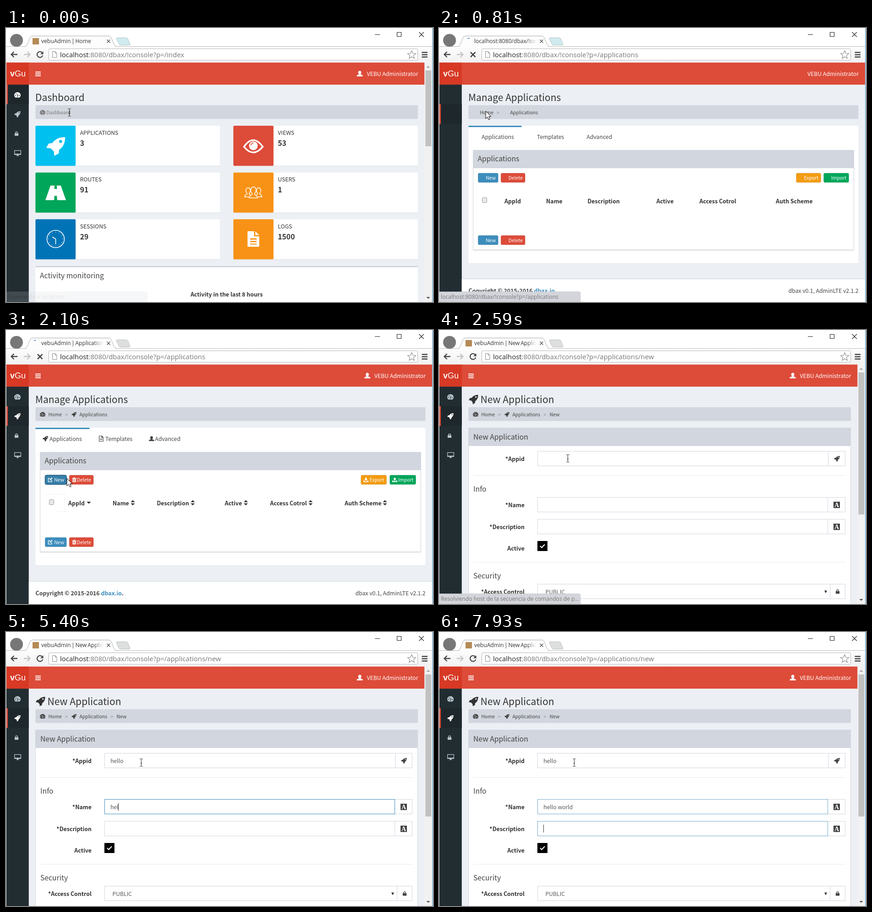
Recreate the animation shown at these times as an HTML page. Size 933x600 px, loop 8 s.

```html
<!DOCTYPE html>
<html lang="en">
<head>
<meta charset="utf-8">
<title>Admin console</title>
<style>
html, body { margin: 0; width: 100%; height: 100%; overflow: hidden; background: #fff; }
svg { display: block; }
.page { font-family: 'Noto Sans CJK JP', 'Noto Sans CJK SC', 'Noto Sans CJK KR', 'Noto Sans CJK', 'Open Sans', sans-serif; }
.chrome { font-family: 'Open Sans', 'Noto Sans', sans-serif; }
text { white-space: pre; }
</style>
</head>
<body>
<svg id="stage" width="933" height="600" viewBox="0 0 933 600"></svg>
<script>
const icons = {
  rocket: 'M23.500.5C16 .5 11 3 7.500 8L3 8.500 0 14 5.500 14.500 9.500 18.500 10 24 15.500 21 16 16.500C21 13 23.500 8 23.500.5zM19.800 6a1.900 1.900 0 1 0-3.800 0a1.900 1.900 0 1 0 3.800 0z',
  gauge: 'M4 21A12 11.500 0 1 1 20 21zM10.500 18L13 7l1.500.5L13.500 18zM3.500 12h3v3h-3zM6 6h3v3H6zM17.500 12h3v3h-3z',
  lock: 'M3 11h18v12H3zM6 11V8a6 6 0 0 1 12 0v3h-3V8a3 3 0 0 0-6 0v3z',
  desk: 'M0 2h24v16H0zM2 4v10h20V4zM9 18h6v3h2v1H7v-1h2z',
  user: 'M12 1a5.500 6.500 0 0 1 3.500 12l1 2.500 7 2.500v4.500H.5V18l7-2.500 1-2.500A5.500 6.500 0 0 1 12 1z',
  edit: 'M2 4h12l-2 3H5v13h13v-6l3-3v12H2zM21 1l3 3-10 10-4 1 1-4z',
  trash: 'M2 4h6l1-3h6l1 3h6v3H2zM4 8h16v15H4zM7.500 10v10h1.500V10zM11.200 10v10h1.500V10zM15 10v10h1.500V10z',
  down: 'M9 1h6v8h5l-8 8-8-8h5zM0 16h5l4 4h6l4-4h5v7H0z',
  up: 'M9 16V9H4l8-8 8 8h-5v7zM0 16h7v3h10v-3h7v7H0z',
  file: 'M3 0h12l6 6v18H3zM5 2v20h14V8h-6V2zM7 11h10v2H7zM7 15h10v2H7z',
  doc: 'M3 0h10v8h8v16H3zM15 0l6 6h-6zM7 11v2h10v-2zM7 15v2h10v-2zM7 19v1.500h10V19z',
  road: 'M6 4h4.700l-.3 4h3.200l-.3-4H18l6 17H13.800l-.4-5h-2.800l-.4 5H0z'
};
const icon = (name, x, y, size, fill) =>
  `<path d="${icons[name]}" fill="${fill}" fill-rule="evenodd" transform="translate(${x} ${y}) scale(${size / 24}) translate(-12 -12)"/>`;
const rect = (x, y, w, h, fill, more = '') =>
  `<rect x="${x}" y="${y}" width="${w}" height="${h}" fill="${fill}" ${more}/>`;
const line = (d, stroke, width = 1, more = '') =>
  `<path d="${d}" fill="none" stroke="${stroke}" stroke-width="${width}" ${more}/>`;
const shape = (d, fill, more = '') => `<path d="${d}" fill="${fill}" ${more}/>`;
// The page is shown at 97.5 %, and the CJK family carries enlarged Latin letters.
const ZOOM = 0.975, LATIN = 0.895;
const label = (x, y, size, str, fill = '#333', more = '') =>
  `<text x="${x}" y="${y}" font-size="${(size * ZOOM * LATIN).toFixed(2)}" fill="${fill}" ${more}>${str}</text>`;
const ui = (x, y, size, str, fill, more = '') =>
  `<text x="${x}" y="${y}" font-size="${size}" fill="${fill}" ${more}>${str}</text>`;
const group = (id, body, more = '') => `<g id="${id}" ${more}>${body}</g>`;
const bold = 'font-weight="700"', end = 'text-anchor="end"', STRONG = 14.250;
const RED = '#dd4b39', BLUE = '#3c8dbc', GREY = '#d2d6de', DARK = '#444';
const LEFT = 64.350, TOP = 75.300, HEAD = 50 * ZOOM;

function frame(right, active, loaded) {
  const marks = [['gauge', 25, 147], ['rocket', 25, 189], ['lock', 23, 231], ['desk', 25.500, 274]];
  const low = TOP + HEAD, item = 44 * ZOOM, top = low + active * item;
  let s = rect(1, TOP, 930, 525, '#ecf0f5') + rect(1, TOP, right - 1, HEAD, RED) +
    rect(1, TOP, HEAD, HEAD, '#d73925') + rect(1, low, HEAD, 476, '#222d32') +
    rect(1, top, HEAD, item, '#1e282c') + rect(1, top, 3, item, RED) +
    `<text x="9" y="106" font-size="18" fill="#fff" font-family="Liberation Sans, sans-serif"><tspan ${bold}>v</tspan>Gu</text>` +
    label(right - 14, 105, 14, 'VEBU Administrator', '#fff', end);
  if (loaded) {
    s += line('M64 96.500h12M64 100.500h12M64 104.500h12', '#fff', 2) + icon('user', right - 141.500, 100, 13.500, '#fff');
    marks.forEach(([n, x, y], i) => {
      s += icon(n, x, y, n === 'lock' ? 11 : n === 'desk' ? 15 : 14, i === active ? '#fff' : '#b8c7ce');
    });
  }
  return s + rect(LEFT, 169, right - 14.500 - LEFT, 30.300, GREY, 'rx="2"');
}

function scrollbar(thumb) {
  return rect(914.500, TOP, 16.500, 525, '#f1f1f1') + rect(916.500, 93, 12.700, thumb, '#c1c1c1') +
    shape('M918.500 87l4-4 4 4z', '#a3a3a3') + shape('M918.500 589l4 4 4-4z', '#505050');
}

const crumb = (x, str, fill = DARK) => label(x, 189, 12, str, fill);

function dashboard() {
  const cards = [
    ['APPLICATIONS', 3, '#00c0ef'], ['VIEWS', 53, RED], ['ROUTES', 91, '#00a65a'],
    ['USERS', 1, '#f89216'], ['SESSIONS', 29, '#0073b7'], ['LOGS', 1500, '#f89216']];
  const side = 90 * ZOOM;
  let s = frame(914.500, 0, true) + label(64, 160, 24.200, 'Dashboard') +
    icon('gauge', 80, 185, 12, '#777') + crumb(88, 'Dashboard', '#777');
  cards.forEach(([name, count, color], i) => {
    const x = i % 2 ? 496.800 : LEFT, y = 214 + (i >> 1) * 105 * ZOOM;
    s += rect(x, y + 1, 403.200, side, '#d8dce1', 'rx="2"') + rect(x, y, 403.200, side, '#fff', 'rx="2"') +
      rect(x, y, side, side, color, 'rx="2"') + label(x + 97.300, y + 20, 14, name) +
      label(x + 97.300, y + 44, 18, count, '#333', bold);
  });
  const person = (x, y, k) => line('M-9 13h18c0-5-3-5-6-7v-3c5-5 3-14-3-14s-8 9-3 14v3c-3 2-6 2-6 7z', '#fff', 1.500 / k,
    `transform="translate(${x} ${y}) scale(${k})"`);
  s += icon('rocket', 109, 259, 42, '#fff') +
    line('M520 260q20-29 41 0q-21 25-41 0z', '#fff', 3.500) +
    '<circle cx="540.500" cy="258" r="9.500" fill="#fff"/>' + line('M535 257q1-5 6-5', RED, 1.700) +
    icon('road', 108.500, 360, 45, '#fff') +
    person(529, 359, 0.82) + person(552, 359, 0.82) +
    shape('M531 371q1-6 6-7v-3c-5-6-2-14 3.500-14s8 8 3 14v3q6 1 7 7z', '#f89216') + person(540.500, 359, 1) +
    '<circle cx="108.500" cy="462" r="19" fill="none" stroke="#fff" stroke-width="1.600"/>' +
    line('M101 457.500l7.500 4.500v11.500', '#fff', 1.700);
  for (let a = 0; a < 360; a += 30)
    s += line('M108.500 446v1.500', '#fff', 1, `transform="rotate(${a} 108.500 462)"`);
  return s + icon('doc', 540.500, 462, 34, '#fff') +
    rect(LEFT, 521, 835.600, 79, '#fff', 'rx="2"') + rect(LEFT, 521, 835.600, 3, GREY) +
    label(74, 548, 18, 'Activity monitoring', DARK) +
    label(482, 588, STRONG, 'Activity in the last 8 hours', '#333', bold + ' text-anchor="middle"') + scrollbar(166);
}

function button(x, y, w, color, mark, str, loaded, more = 'stroke="#000" stroke-opacity=".1"') {
  return rect(x + .5, y + .3, w - 1, 20.500, color, 'rx="3" ' + more) +
    (loaded ? icon(mark, x + 11.500, y + 10.500, 11, '#fff') : '') +
    label(x + w - 5.700, y + 14.500, 12, str, '#fff', end + ' font-weight="500"');
}

function applications(loaded) {
  const pick = (raw, full) => loaded ? full : raw;
  const wide = 916.500 - LEFT;
  let s = frame(931, 1, loaded) + label(64, 160, 24, 'Manage Applications') +
    crumb(pick(89.500, 92.500), 'Home') + crumb(pick(126, 129), '&gt;', '#888') + crumb(pick(155.500, 160.500), 'Applications') +
    rect(LEFT, 215, wide, 301.500, '#dde1e5', 'rx="2"') + rect(LEFT, 214, wide, 301.500, '#fff', 'rx="2"') +
    rect(LEFT, 214, pick(116, 118), 3, BLUE);
  [['Applications', 93, 95], ['Templates', 214, 217], ['Advanced', 322.500, 325.500]].forEach(([n, a, b]) => {
    s += label(pick(a, b), 243, 14, n, DARK);
  });
  s += rect(74.500, 267.500, 832, 218.500, '#fff', 'stroke="#cfd3d9" rx="2"') + line('M75 486.500h831', '#c4c8cc') +
    rect(74, 267, 833, 40, GREY, 'rx="2"') + label(84.500, 292, 18, 'Applications', DARK);
  for (const y of [317.500, 454])
    s += button(84.800, y, pick(45, 48), BLUE, 'edit', 'New', loaded) +
      button(pick(134.700, 137.700), y, 54, RED, 'trash', 'Delete', loaded);
  s += button(pick(780, 775), 317.500, pick(55, 57), '#f39c12', 'down', 'Export', loaded) +
    button(pick(840, 838), 317.500, pick(56, 58), '#00a65a', 'up', 'Import', loaded) +
    rect(94.500, 371.500, 10, 11, '#e8e8e8', 'stroke="#999" rx="2"');
  [['AppId', 143, 136], ['Name', 234, 233, 277], ['Description', 324.500, 329.500, 408], ['Active', 475, 478, 524],
   ['Access Cotrol', 569, 577, 665.500], ['Auth Scheme', 736, 740, 828]].forEach(([n, a, b, sort]) => {
    s += label(pick(a, b), 384, STRONG, n, '#333', bold);
    if (loaded && sort) s += shape(`M${sort - 4.500} 377l4.500-4.500 4.500 4.500zm0 2.500h9l-4.500 4.500z`, '#333');
  });
  if (loaded)
    s += shape('M176.500 376h9l-4.500 4.500z', '#333') + line('M85 359.500h46M114 397.500h20M128.500 360v37', '#f1f1f1') +
      icon('gauge', 80, 185, 12, DARK) + icon('rocket', 148.500, 185, 11, DARK) + icon('rocket', 86, 238, 12.500, DARK) +
      icon('file', 208, 238, 13, DARK) + icon('user', 318, 238, 12, DARK);
  const foot = pick(549, 550);
  return s + rect(49.750, foot, 881.250, 600 - foot, '#fff') + line(`M50 ${foot + .5}h881`, GREY) +
    label(64.500, foot + 31, STRONG, `Copyright © 2015-2016 <tspan fill="${BLUE}">dbax.io</tspan>.`, DARK, bold) +
    label(916.500, foot + 30.500, 14, 'dbax v0.1, AdminLTE v2.1.2', DARK, end);
}

function form() {
  const fields = [['appid', '*Appid', 265, 850.500], ['name', '*Name', 366, 849.500], ['desc', '*Description', 414, 849.500]];
  let s = frame(914.500, 1, true) + icon('rocket', 75.500, 152, 21, '#333') + label(90.500, 160, 24.200, 'New Application') +
    icon('gauge', 80, 185, 12, DARK) + crumb(92.500, 'Home') + crumb(129, '&gt;', '#888') +
    icon('rocket', 148.500, 185, 11, DARK) + crumb(160.500, 'Applications') + crumb(228.500, '&gt;', '#888') + crumb(241.500, 'New') +
    rect(64.500, 214.500, 835, 400, '#fff', `stroke="${GREY}"`) + rect(LEFT, 214, 835.600, 40, GREY, 'rx="2"') +
    label(75, 240, 18, 'New Application', DARK) + label(75, 354, 18, 'Info', DARK) + label(75, 544, 18, 'Security', DARK) +
    line('M75 318.500h814M75 508.500h814', '#e8eaee');
  for (const [id, name, y, right] of fields) {
    s += label(187, y + 22, STRONG, name, '#333', bold + ' ' + end) +
      rect(right, y + .5, 887.500 - right, 32, '#fff', `stroke="${GREY}"`) +
      rect(215.500, y + .5, right - 215.500, 32, '#fff', `id="${id}Box" stroke="${GREY}"`) +
      label(228.200, y + 21.500, 14, '', '#555', `id="${id}Text"`);
    s += id === 'appid' ? icon('rocket', 869.500, y + 17, 13, DARK) :
      rect(862, y + 10, 14, 14, DARK) +
      `<text x="869" y="${y + 22}" font-size="14" font-weight="700" fill="#fff" text-anchor="middle" font-family="Liberation Serif, serif">A</text>`;
  }
  return s + label(187, 483, STRONG, 'Active', '#333', bold + ' ' + end) + rect(215, 462, 22, 22, '#000') +
    line('M221 473l3.500 3.500 6.500-7', '#fff', 2) +
    label(187, 578, STRONG, '*Access Control', '#333', bold + ' ' + end) +
    rect(854.500, 556.500, 33, 32, '#fff', `stroke="${GREY}"`) + rect(215.500, 556.500, 639, 32, '#fff', `stroke="${GREY}"`) +
    label(232.500, 578, 14, 'PUBLIC', '#555') + shape('M842 570.500h6l-3 6z', '#333') + icon('lock', 871, 572.500, 11, DARK) +
    rect(0, 0, 1, 17, '#333', 'id="caret"') + scrollbar(311);
}

function browser() {
  return rect(0, 0, 933, TOP, '#fff') + rect(0, 41, 931, TOP - 41, 'url(#bar)') + line('M0 40.500h931', '#b9b9b9') +
    shape('M42 41.500C49 40 50 18 57 17.500H225C233 18 233 40 241 41.500z', '#fdfdfd') +
    line('M42 40.500C49 39 50 18 57 17.500H225C233 18 233 39 241 40.500', '#aaa') +
    '<circle cx="23" cy="27" r="14" fill="#777"/>' +
    rect(58, 22, 14, 14, '#b58a55', 'id="fav"') +
    line('M62 23a6 6 0 0 1 5 0', '#5b7fc4', 1.500, 'id="spin"') +
    ui(77, 33, 12.100, '', '#333', 'id="tab" clip-path="url(#tabClip)"') + rect(192, 19, 21, 20, 'url(#fade)') +
    line('M220.500 25.500l7 7m0-7l-7 7', '#555', 1.400) +
    shape('M243 21.500h20q2 0 3 2l5 12q0 2-2 2H250q-2 0-3-2l-6-12q0-2 2-2z', '#ddd', 'id="plus" stroke="#b5c2c6"') +
    line('M806 14.500h11M854.500 9.500h9v9h-9zM902.500 9l10.500 10.500m0-10.500L902.500 19.500', '#222', 1.100) +
    line('M25 58H12M17.500 52l-6 6 6 6', '#444', 2.300) + line('M39 58h13M46.500 52l6 6-6 6', '#c4c4c4', 2.300) +
    group('reload', line('M79.500 54.500a6.300 6.300 0 1 0 .8 5.500', '#444', 2.200) + shape('M81.500 51v6.500H75z', '#444')) +
    line('M69 53l10.500 10.500m0-10.500L69 63.500', '#444', 2.500, 'id="stop"') +
    rect(93.500, 45.500, 806, 25, '#fff', 'rx="2" stroke="#b8b8b8"') +
    line('M101.500 51.500h6l3.500 3.500v9.500h-9.500zM107.500 51.500v3.500h3.500', '#888') +
    ui(118, 63.500, 14.950, '', '#777', 'id="url"') +
    line('M886.500 49.500l2.500 6 6.500.5-5 4.200 1.600 6.300-5.600-3.500-5.600 3.500 1.600-6.300-5-4.200 6.500-.5z', '#888', 1.100) +
    line('M908.500 53.500h12.500M908.500 58.500h12.500M908.500 63.500h12.500', '#444', 2.600);
}

const statusBar = shape('M0 577.500H306q3 0 3 3V600H0z', '#d3d5db', 'stroke="#c3c5ca" stroke-width=".6"') +
  ui(4, 593, 12.100, '', '#777', 'id="statusText"');
const cursors = {
  beam: line('M-2.500-8.500q3 0 3 2V6.500q0 2-3 2M3.500-8.500q-3 0-3 2M3.500 8.500q-3 0-3-2M-1 1.500h3', '#222'),
  arrow: shape('M0 0V16.500l3.800-3.700 2.700 6 2.800-1.200-2.600-5.800H12z', '#fff', 'stroke="#000"'),
  hand: shape('M-1.500 1.500q0-2 1.700-2t1.800 2V8l1.700-.8 1.600 1.300 1.700-.7 1.500 1.500 1.500 0 .5 1.500v4.500l-2 3.500v2.500h-8v-2.500l-6-7.500q0-2 2-1.700l2 2z', '#fff', 'stroke="#000"')
};

document.getElementById('stage').innerHTML =
  `<defs><linearGradient id="bar" x2="0" y2="1"><stop stop-color="#fdfdfd"/><stop offset="1" stop-color="#f1f1f1"/></linearGradient>
  <linearGradient id="fade"><stop stop-color="#fdfdfd" stop-opacity="0"/><stop offset="1" stop-color="#fdfdfd"/></linearGradient>
  <clipPath id="tabClip"><rect x="75" y="18" width="138" height="22"/></clipPath></defs>` +
  group('dash', dashboard(), 'class="page"') + group('raw', applications(false), 'class="page"') +
  group('apps', applications(true) + group('pressed', button(84.800, 317.500, 48, '#367fa9', 'edit', 'New', true, 'stroke="#204d74"')), 'class="page"') +
  group('form', form(), 'class="page"') + group('chrome', browser(), 'class="chrome"') +
  group('status', statusBar, 'class="chrome"') +
  rect(931, 0, 2, 600, '#fff') + rect(931.500, 0, 1, 600, '#2f86bd') + rect(0, TOP, 1, 525, '#d5dde2') +
  group('mouse', Object.keys(cursors).map(k => group(k, cursors[k])).join(''));

const el = {};
document.querySelectorAll('[id]').forEach(n => { el[n.id] = n; });
const show = (n, on) => { n.style.display = on ? '' : 'none'; };
const put = (n, str) => { if (n.textContent !== str) n.textContent = str; };
const at = (list, t) => list.reduce((v, [from, value]) => t >= from ? value : v, list[0][1]);

const host = 'localhost:8080';
const path = [[0, 138, 185], [335, 26, 189], [480, 26, 189], [808, 102, 182], [926, 102, 182],
  [1516, 98, 335], [1760, 98, 335], [2578, 281, 281], [2932, 295, 286]];
const pointer = [[0, 'beam'], [100, 'arrow'], [330, 'hand'], [560, 'arrow'], [1500, 'hand'], [1800, 'arrow'], [2400, 'beam']];
const typed = {
  appid: [[0, ''], [3760, 'h'], [3880, 'he'], [4000, 'hel'], [4120, 'hell'], [4240, 'hello']],
  name: [[0, ''], [4720, 'he'], [4970, 'hel'], [5180, 'hell'], [5400, 'hel'], [5660, 'he'], [5780, 'h'], [5890, ''],
    [6690, 'he'], [6810, 'hel'], [6930, 'hell'], [7060, 'hello'], [7270, 'hello '], [7380, 'hello w'],
    [7490, 'hello wo'], [7600, 'hello wor'], [7710, 'hello worl'], [7820, 'hello world']],
  desc: [[0, '']]
};
const focus = { appid: [2690, 4360], name: [4360, 7930], desc: [7930, 9000] };
const caretTop = { appid: 273, name: 374.500, desc: 422 };

function mouseAt(t) {
  let i = 0;
  while (i < path.length - 2 && t >= path[i + 1][0]) i++;
  const [t0, x0, y0] = path[i], [t1, x1, y1] = path[i + 1];
  const p = Math.min(1, (t - t0) / (t1 - t0)), k = p * p * (3 - 2 * p);
  return [x0 + (x1 - x0) * k, y0 + (y1 - y0) * k];
}

function glow([on, off], t) {
  if (t < on) return 0;
  if (t < off) return t < on + 110 ? .6 : 1;
  return t < off + 110 ? .6 : 0;
}

function blend(k) {
  const a = [210, 214, 222], b = [60, 141, 188];
  return `rgb(${a.map((v, i) => Math.round(v + (b[i] - v) * k))})`;
}

function draw(t) {
  // The screen was sampled about every 118 ms.
  const q = t < 100 ? 0 : 100 + 118 * Math.floor((t - 100) / 118);
  const scene = at([[0, 'dash'], [690, 'raw'], [1040, 'apps'], [2100, 'form']], q);
  for (const id of ['dash', 'raw', 'apps', 'form']) show(el[id], id === scene);

  const busy = q >= 440 && q < 1040 || q >= 1750 && q < 2100;
  show(el.fav, !busy);
  show(el.spin, busy);
  show(el.reload, !busy);
  show(el.stop, busy);
  el.spin.setAttribute('transform', `rotate(${(q - 808) * .6} 64.500 29)`);
  el.plus.setAttribute('fill', q < 1040 ? '#d0ebf0' : '#dedede');
  const page = { dash: 'index', raw: 'applications', apps: 'applications', form: 'applications/new' }[scene];
  const url = '/dbax/!console?p=/' + page;
  if (el.url.textContent !== host + url)
    el.url.innerHTML = `<tspan fill="#222">localhost</tspan>:8080${url}`;
  const title = { dash: 'Home', apps: 'Applications', form: 'New Application' }[scene];
  put(el.tab, title ? 'vebuAdmin | ' + title : host + url);
  el.tab.setAttribute('word-spacing', title ? -1.5 : 0);
  show(el.pressed, q >= 1600);

  const message = at([[0, 'Esperando a localhost...'], [100, ''], [330, host + '/dbax/!console?p=/applications'],
    [1150, ''], [2220, 'Resolviendo host de la secuencia de comandos de p...'], [2800, '']], q);
  show(el.status, message);
  put(el.statusText, message);
  el.status.setAttribute('opacity', q < 100 ? .18 : 1);

  if (scene === 'form') {
    for (const id in focus) {
      put(el[id + 'Text'], at(typed[id], t));
      el[id + 'Box'].setAttribute('stroke', blend(glow(focus[id], t)));
    }
    const id = Object.keys(focus).find(k => t >= focus[k][0] && t < focus[k][1]);
    const off = t >= 3260 && t < 3760 || t >= 6350 && t < 6690;
    show(el.caret, id && !off);
    if (id) {
      const text = el[id + 'Text'];
      const width = text.textContent ? text.getComputedTextLength() : 0;
      el.caret.setAttribute('x', Math.floor(228.200 + width));
      el.caret.setAttribute('y', caretTop[id]);
    }
  }

  const [x, y] = mouseAt(q), kind = at(pointer, q);
  for (const k in cursors) show(el[k], k === kind);
  el.mouse.setAttribute('transform', `translate(${Math.round(x)} ${Math.round(y)})`);
}

const start = performance.now();
function tick() {
  draw((performance.now() - start) % 8000);
  requestAnimationFrame(tick);
}
tick();
</script>
</body>
</html>
```
